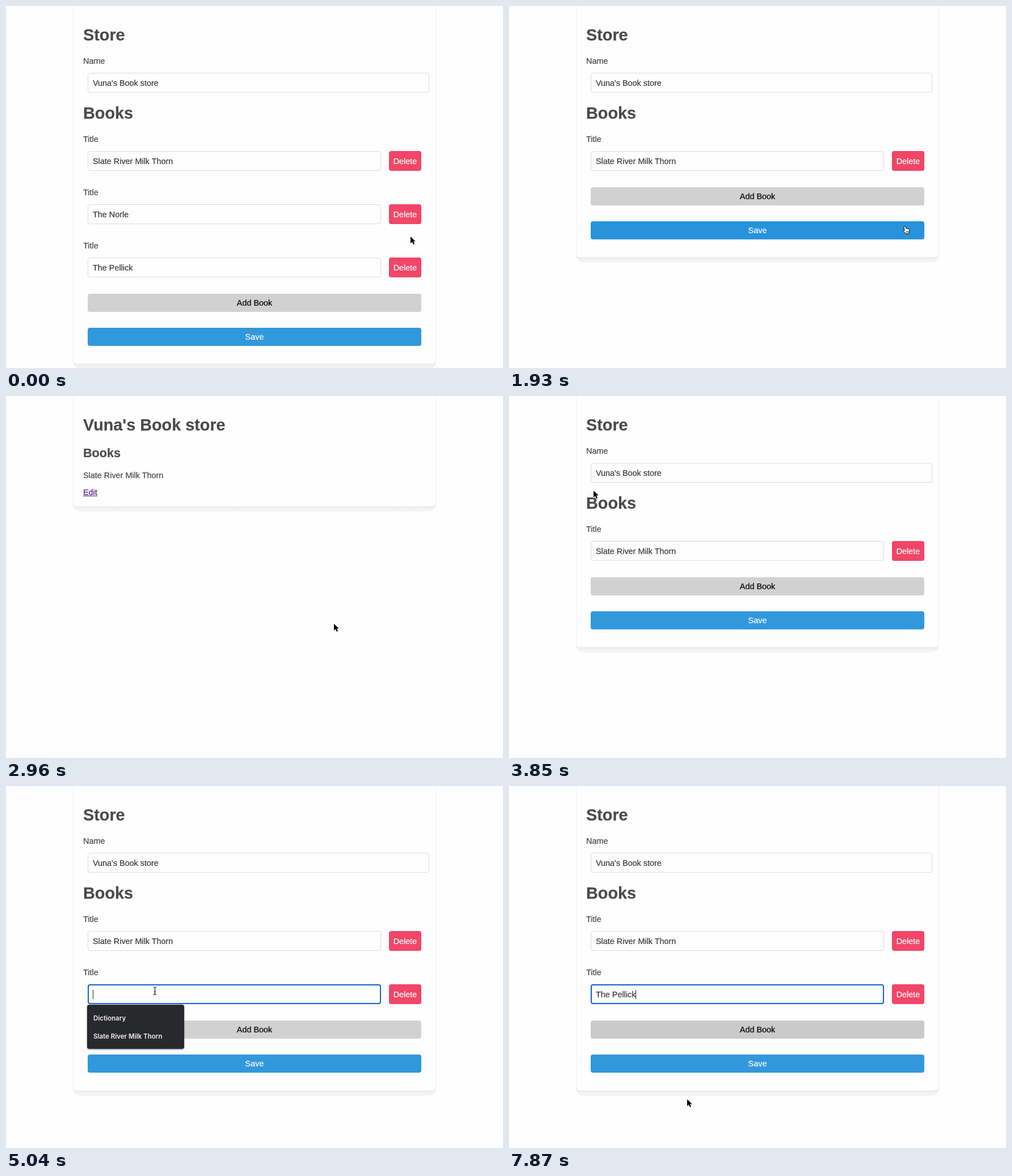
Write an HTML page that moves like this. It is 876 px wide and 639 px high and loops after 8000 ms.

```html
<!DOCTYPE html>
<html lang="en">
<head>
<meta charset="utf-8">
<title>Book store form</title>
<style>
  html, body { margin: 0; width: 100%; height: 100%; overflow: hidden; background: #fefefe; }
  #stage { position: relative; width: 876px; height: 639px; overflow: hidden;
    font: 14.4px/20px "Liberation Sans", Arial, sans-serif; color: #424242;
    -webkit-text-stroke: .2px; }
  #stage div { position: absolute; box-sizing: border-box; white-space: pre; }
  #page { inset: 0; }
  .shade { left: 118px; width: 640px; height: 24px; border-radius: 0 0 14px 14px;
    background: linear-gradient(#ebebeb 62%, #f4f4f4 85%); }
  .card { left: 118px; top: -3px; width: 640px; background: #fefefe;
    border: 1px solid #f0f0f0; border-radius: 6px; }
  .text { left: 136px; transform: translateY(-50%); }
  .h1, .h2 { font-weight: bold; color: #4a4a4a; line-height: 1.2; }
  .h1 { font-size: 28.8px; }
  .h2 { font-size: 21.6px; }
  .link { color: #551a8b; text-decoration: underline; }
  .field { left: 144px; height: 35px; padding-left: 8px; display: flex; align-items: center;
    border: 1px solid #dbdbdb; border-radius: 4px; color: #363636; }
  .focus { border: 2px solid #1260cc; padding-left: 7px; }
  .focus i { width: 1px; height: 16px; background: #222; }
  .focus i.off { visibility: hidden; }
  .button { left: 144px; width: 588px; height: 32px; line-height: 32px; border-radius: 4px;
    text-align: center; color: #fff; }
  .delete { left: 675px; width: 57px; height: 35px; line-height: 36px; background: #f14668; }
  .delete.hover { background: #f03a5f; }
  .add { background: #d1d1d1; color: #000; }
  .add.hover { background: #cacaca; }
  .save { background: #3298dc; }
  .save.hover { background: #2793da; }
  .menu { left: 143px; top: 386px; width: 171px; height: 78px; padding: 8px 0 0 11px;
    border-radius: 4px; background: #28292d; box-shadow: 0 1px 3px rgba(0,0,0,.45);
    color: #f1f1f2; font: 600 11.5px/32px Inter, sans-serif; -webkit-text-stroke: 0; }
  #cursor { left: 0; top: 0; }
  #cursor svg { position: absolute; left: 0; top: 0; overflow: visible; display: none; }
</style>
</head>
<body>
<div id="stage">
  <div id="page"></div>
  <div id="cursor">
    <svg id="arrow" width="12" height="17">
      <path d="M0 0V12L2.9 9.4 4.9 14 7 13.1 5 8.6H8.7Z" fill="#000" stroke="#fff" stroke-width="1.6" paint-order="stroke"/>
    </svg>
    <svg id="hand" width="14" height="15" fill="#fff" stroke="#000" stroke-linejoin="round">
      <path d="M4.2 1C5 .7 5.7 1.2 6 2L7.1 5.2C7.5 4.5 8.7 4.6 9 5.4 9.5 4.8 10.6 4.9 10.9 5.8 11.5 5.5 12.6 5.8 12.7 6.7L12.9 9.2C12.9 10.8 12.1 11.3 11.9 12.9V14H6.2C5.6 12.3 3.6 11 2.2 9.2 .9 7.8 1.6 6.7 2.8 7.4L4.4 8.7 3 3C2.8 2 3.3 1.3 4.2 1Z"/>
      <path d="M7.4 9.2V12M9.1 9.2V12M10.8 9.2V12" stroke-width=".8"/>
    </svg>
    <svg id="beam" width="7" height="15" fill="none">
      <path d="M.5 .7Q3 .7 3.5 2 4 .7 6.5 .7M3.5 2V13M.5 14.3Q3 14.3 3.5 13 4 14.3 6.5 14.3M2 9.5H5" stroke="#fff" stroke-width="2.4"/>
      <path d="M.5 .7Q3 .7 3.5 2 4 .7 6.5 .7M3.5 2V13M.5 14.3Q3 14.3 3.5 13 4 14.3 6.5 14.3M2 9.5H5" stroke="#111" stroke-width="1.1"/>
    </svg>
  </div>
</div>
<script>
const LOOP = 8000, ROW = 94;
const STORE = "Vuna's Book store";
const [BREAD, NORLE, PELLICK] = ["Slate River Milk Thorn", "The Norle", "The Pellick"];

// Each track holds its value until the next entry.
const screens = [
  [0, { books: [BREAD, NORLE, PELLICK] }],
  [740, { books: [BREAD, PELLICK], hover: "delete1" }],
  [1190, { books: [BREAD] }],
  [1340, { books: [BREAD], hover: "save" }],
  [2370, { view: true }],
  [3850, { books: [BREAD] }],
  [4450, { books: [BREAD], hover: "add" }],
  [4600, { books: [BREAD, ""] }],
  [4900, { books: [BREAD, ""], focus: 1 }],
  [5040, { books: [BREAD, ""], focus: 1, menu: true }],
  [5640, { books: [BREAD, ""], focus: 1 }],
  [7870, { books: [BREAD, ""], focus: 1, hover: "add" }]
];
const typed = [[0, 0], [5640, 1], [5790, 3], [5930, 4], [6980, 5], [7130, 6], [7280, 7], [7430, 9], [7580, 11]];
const caret = [[0, true], [6530, false], [6980, true]];
const pointer = [
  [0, "arrow", 713, 407], [140, "arrow", 713, 401], [290, "arrow", 711, 389], [440, "hand", 702, 376],
  [1340, "hand", 702, 379], [1490, "hand", 700, 383], [1640, "hand", 697, 386], [1790, "hand", 693, 388],
  [1940, "hand", 689, 389], [2070, "hand", 686, 389], [2220, "hand", 685, 389],
  [2370, "arrow", 689, 390], [2520, "arrow", 675, 392], [2670, "arrow", 635, 397],
  [2820, "arrow", 595, 401], [2960, "arrow", 578, 402],
  [3260, "arrow", 560, 398], [3410, "arrow", 450, 340], [3560, "arrow", 280, 240], [3710, "hand", 145, 166],
  [3850, "arrow", 149, 167], [4000, "arrow", 175, 210], [4150, "arrow", 235, 285], [4300, "arrow", 280, 316],
  [4450, "hand", 285, 341], [4600, "arrow", 289, 342], [4750, "beam", 267, 350], [4900, "beam", 259, 354],
  [7870, "arrow", 314, 553]
];

const $ = id => document.getElementById(id);
const at = (track, t) => track.findLast(step => step[0] <= t);
const box = (cls, top, content = "", style = "") =>
  `<div class="${cls}" style="top:${top}px;${style}">${content}</div>`;
const text = (y, content, cls = "") => box("text " + cls, y, content);
const card = bottom => box("shade", bottom - 15) + box("card", -3, "", `height:${bottom + 3}px`);

function viewPage() {
  return card(195) + text(51, STORE, "h1") + text(101, "Books", "h2") +
    text(139.5, BREAD) + text(169.5, "Edit", "link");
}

function formPage({ books, hover, focus, menu }, count, caretOn) {
  const button = (name, top, label, id = name) =>
    box(`button ${name} ${id === hover ? "hover" : ""}`, top, label);
  const end = books.length * ROW;
  const rows = books.map((title, i) => {
    const y = i * ROW, active = i === focus;
    const content = active
      ? `<span>${PELLICK.slice(0, count)}</span><i class="${caretOn ? "" : "off"}"></i>`
      : title;
    return text(234.5 + y, "Title") +
      box("field" + (active ? " focus" : ""), 256 + y, content, "width:517px") +
      button("delete", 256 + y, "Delete", "delete" + i);
  });
  return card(350 + end) + text(51, "Store", "h1") + text(96.5, "Name") +
    box("field", 118, STORE, "width:602px") + text(189, "Books", "h1") + rows.join("") +
    button("add", 226 + end, "Add Book") + button("save", 286 + end, "Save") +
    (menu ? box("menu", 386, `Dictionary\n${BREAD}`) : "");
}

let last = "";
function draw() {
  const t = performance.now() % LOOP;
  const screen = at(screens, t)[1];
  const html = screen.view ? viewPage() : formPage(screen, at(typed, t)[1], at(caret, t)[1]);
  if (html !== last) $("page").innerHTML = last = html;

  const [, shape, x, y] = at(pointer, t);
  for (const name of ["arrow", "hand", "beam"]) $(name).style.display = name === shape ? "block" : "none";
  $("cursor").style.transform = `translate(${x}px, ${y}px)`;
  requestAnimationFrame(draw);
}
draw();
</script>
</body>
</html>
```
